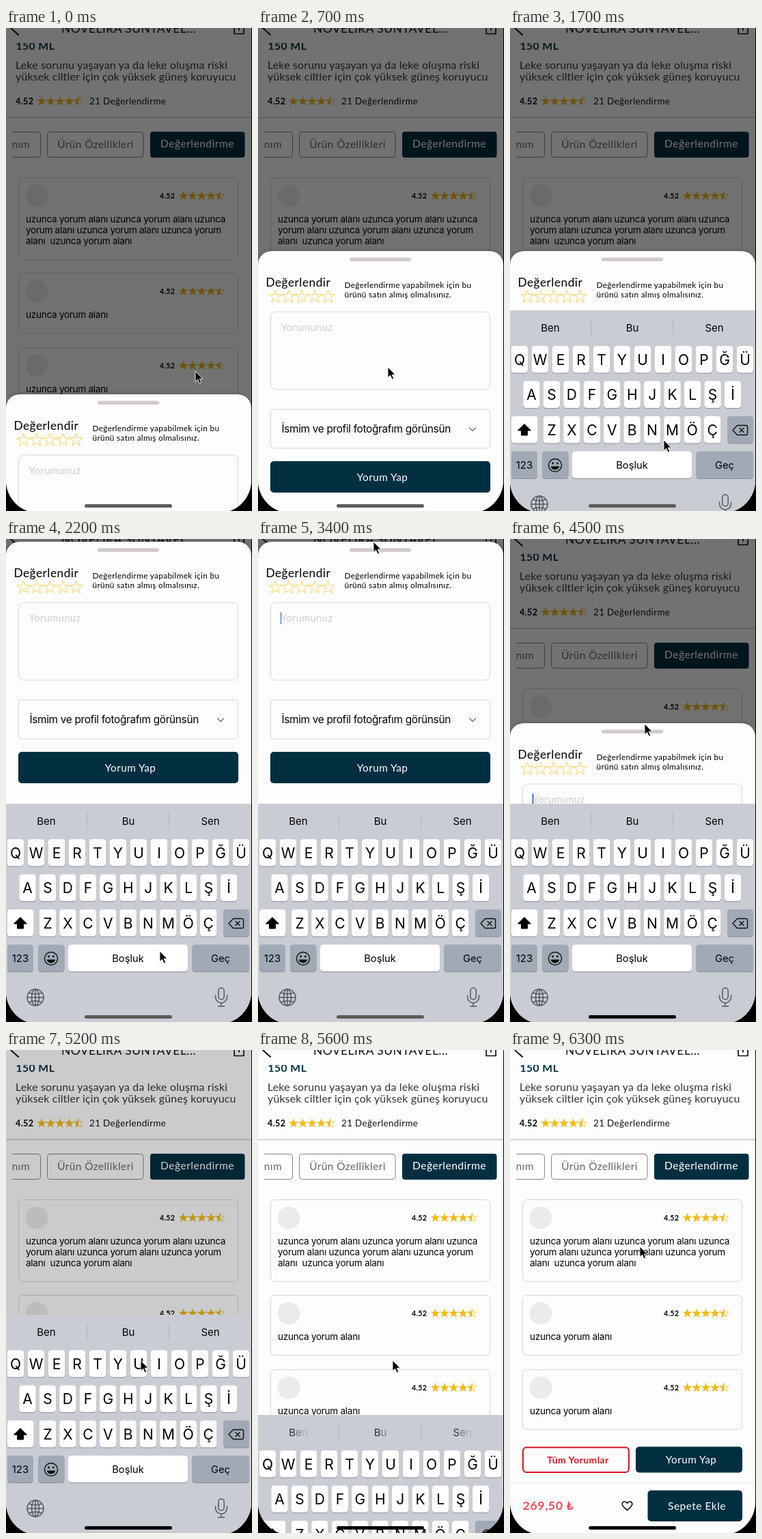
An HTML page that plays this animation: 360 by 708 pixels, repeating every 6400 ms.

```html
<!DOCTYPE html>
<html lang="tr">
<head>
<meta charset="utf-8">
<title>Değerlendirme</title>
<style>
html, body { margin: 0; width: 100%; height: 100%; overflow: hidden; background: #000; }
svg { display: block; width: 100%; height: 100%; }
text { font-family: Lato, "Open Sans", sans-serif; letter-spacing: .028em; white-space: pre; }
.copy text { letter-spacing: .012em; }
.ui { font-family: Inter, Roboto, sans-serif; letter-spacing: -.022em; }
.key { font-family: Inter, Roboto, sans-serif; letter-spacing: 0; }
.mid { text-anchor: middle; }
.b { font-weight: 700; }
.navy { fill: #022f40; }
.white { fill: #fff; }
.box { fill: none; stroke: #d6d6d6; }
.line { fill: none; stroke-linecap: round; stroke-linejoin: round; }

#sheet, #keys, #shade, #caret, #home, #cursor, .fade {
  animation: 6.4s step-end infinite;
}
#sheet { animation-name: sheet; filter: drop-shadow(0 0 3px rgba(0, 0, 0, .25)); }
#keys { animation-name: keys; }
#shade { animation-name: shade; }
#caret { animation-name: caret; }
#home { animation-name: home; }
#cursor { animation-name: cursor; }
.fade { animation-name: fade; }
#blink { animation: blink 1.066667s linear infinite; }

/* 1.5625% of the loop is 100 ms */
@keyframes sheet {
  0% { transform: translateY(537px); }
  1.5625% { transform: translateY(418px); }
  3.125% { transform: translateY(357px); }
  4.6875% { transform: translateY(334px); }
  6.25% { transform: translateY(327px); }
  28.125% { transform: translateY(190px); }
  29.6875% { transform: translateY(75px); }
  31.25% { transform: translateY(22px); }
  32.8125%, 53.125% { transform: translateY(4px); }
  54.6875% { transform: translateY(8px); animation-timing-function: steps(10); }
  70.3125% { transform: translateY(270px); animation-timing-function: steps(5); }
  78.125% { transform: translateY(453px); }
  79.6875% { transform: translateY(570px); }
  81.25% { transform: translateY(650px); }
  82.8125% { transform: translateY(695px); }
  84.375%, 100% { transform: translateY(730px); }
}
@keyframes shade {
  0%, 78.125% { opacity: .55; }
  79.6875% { opacity: .38; }
  81.25% { opacity: .2; }
  82.8125% { opacity: .08; }
  84.375%, 100% { opacity: 0; }
}
@keyframes keys {
  0% { transform: translateY(330px); }
  23.4375% { transform: translateY(200px); }
  25% { transform: translateY(90px); }
  26.5625% { transform: translateY(26px); }
  28.125% { transform: translateY(0); }
  85.9375% { transform: translateY(60px); }
  87.5% { transform: translateY(147px); }
  89.0625% { transform: translateY(235px); }
  90.625% { transform: translateY(300px); }
  92.1875%, 100% { transform: translateY(330px); }
}
@keyframes fade {
  0% { fill-opacity: 1; }
  87.5% { fill-opacity: var(--o); }
  89.0625%, 100% { fill-opacity: 0; }
}
@keyframes caret {
  0% { opacity: 0; }
  26.5625% { opacity: 1; }
  84.375%, 100% { opacity: 0; }
}
@keyframes blink {
  0%, 12% { opacity: 0; }
  21.8%, 62% { opacity: 1; }
  75%, 100% { opacity: 0; }
}
@keyframes home {
  0% { fill: #5f5a5b; }
  60.9375%, 100% { fill: #000; }
}
@keyframes cursor {
  0% { transform: translate(277px, 503px); animation-timing-function: steps(7); }
  10.9375% { transform: translate(190px, 497px); animation-timing-function: steps(7); }
  21.875% { transform: translate(205px, 505px); animation-timing-function: steps(3); }
  26.5625% { transform: translate(225px, 604px); }
  39.0625% { transform: translate(225px, 604px); animation-timing-function: steps(3); }
  43.75% { transform: translate(196px, 215px); animation-timing-function: steps(6); }
  53.125% { transform: translate(169px, 4px); }
  54.6875% { transform: translate(169px, 9px); animation-timing-function: steps(10); }
  70.3125% { transform: translate(197px, 271px); animation-timing-function: steps(5); }
  78.125% { transform: translate(197px, 455px); }
  87.5% { transform: translate(197px, 455px); animation-timing-function: steps(7); }
  98.4375%, 100% { transform: translate(190px, 288px); }
}
</style>
</head>
<body>
<svg viewBox="0 0 360 708" preserveAspectRatio="none">
  <defs>
    <path id="star" d="M0-10 2.4-3.2 9.5-3.1 3.8 1.2 5.9 8.1 0 4-5.9 8.1-3.8 1.2-9.5-3.1-2.4-3.2z"/>
    <g id="stars" fill="#efbb17">
      <use href="#star" transform="scale(.74)"/>
      <use href="#star" transform="translate(13.5) scale(.74)"/>
      <use href="#star" transform="translate(27) scale(.74)"/>
      <use href="#star" transform="translate(40.5) scale(.74)"/>
      <use href="#star" transform="translate(54) scale(.68)" fill="none" stroke="#efbb17"/>
      <path d="M54-7.400 52.200-2.400 47-2.300 51.200.9 49.600 6 54 3z"/>
    </g>
    <clipPath id="screen"><rect y="-100" width="359" height="811" rx="48"/></clipPath>
    <clipPath id="tabs"><rect x="9" y="145" width="350" height="50"/></clipPath>
  </defs>

  <g clip-path="url(#screen)">
    <rect width="360" height="712" fill="#fdfdfd"/>

    <g id="page">
      <text class="b navy" x="14.5" y="32" font-size="15.7">150 ML</text>
      <rect width="360" height="22" fill="#fdfdfd"/>
      <text class="mid" x="179.5" y="6.5" font-size="17.4" fill="#111">NOVELIRA SUNTAVEL...</text>
      <path class="line" d="M18-10 7 0 18 10" stroke="#111" stroke-width="2"/>
      <path class="line" d="M334-6V8.5H348V-6M341-8V3" stroke="#111" stroke-width="1.7"/>

      <g class="copy" font-size="15.9" fill="#333">
        <text x="14" y="60">Leke sorunu yaşayan ya da leke oluşma riski</text>
        <text x="14" y="77">yüksek ciltler için çok yüksek güneş koruyucu</text>
      </g>
      <text class="b" x="14" y="112" font-size="12.6">4.52</text>
      <use href="#stars" x="52" y="107.5"/>
      <text x="122" y="112" font-size="13.4" fill="#111">21 Değerlendirme</text>
      <rect y="130" width="360" height="2.5" fill="#dadada"/>

      <g clip-path="url(#tabs)" font-size="15.4">
        <rect class="box" x="-60" y="152.5" width="110.5" height="37" rx="4" style="stroke:#858585"/>
        <text x="35" y="175.5" text-anchor="end" fill="#6a6a6a">Kullanım</text>
        <rect class="box" x="60.5" y="152.5" width="140.5" height="37" rx="4" style="stroke:#858585"/>
        <text class="mid" x="131" y="175.5" fill="#666">Ürün Özellikleri</text>
        <rect class="navy" x="211" y="152" width="138.5" height="38" rx="4"/>
        <text class="mid white" x="280" y="175" font-size="15.7">Değerlendirme</text>
      </g>

      <g id="cards"></g>

      <rect x="19" y="582.5" width="155" height="36.5" rx="5" fill="none" stroke="#d41525" stroke-width="2"/>
      <text class="mid b" x="99.5" y="606" font-size="14" fill="#d41525">Tüm Yorumlar</text>
      <rect class="navy" x="184" y="581.5" width="156" height="38" rx="5"/>
      <text class="mid white" x="265" y="606" font-size="15.3">Yorum Yap</text>
      <rect y="633.5" width="360" height="1.5" fill="#ececec"/>
      <text class="b" x="18.5" y="674" font-size="17.9" fill="#ee4e5c">269,50 ₺</text>
      <path class="line" d="M171.5 674.5C167 671 164.2 668.5 164.2 665.6C164.2 661.5 169.3 660.7 171.5 664.2C173.7 660.7 178.8 661.5 178.8 665.6C178.8 668.5 176 671 171.5 674.5Z" stroke="#111" stroke-width="1.6"/>
      <rect class="navy" x="201.5" y="645.5" width="138.5" height="45.5" rx="5"/>
      <text class="mid white" x="273.5" y="674" font-size="15.6">Sepete Ekle</text>
    </g>

    <rect id="shade" width="360" height="712"/>

    <g id="sheet">
      <rect width="359" height="900" rx="20" fill="#fdfdfd"/>
      <rect x="134" y="9.5" width="90" height="5.5" rx="2.7" fill="#d3cacc"/>
      <text x="11.5" y="52" font-size="17.3">Değerlendir</text>
      <g id="rate" fill="none" stroke="#f4cf4a" stroke-width=".9"></g>
      <g font-size="11.8">
        <text x="126.5" y="54">Değerlendirme yapabilmek için bu</text>
        <text x="126.5" y="67.5">ürünü satın almış olmalısınız.</text>
      </g>
      <rect class="box" x="18.5" y="89" width="321" height="114" rx="8"/>
      <text x="33.5" y="117" font-size="14.6" fill="#cfcfcf">Yorumunuz</text>
      <g id="caret"><rect id="blink" x="32.5" y="103" width="2" height="18" rx="1" fill="#3f6fd8"/></g>
      <rect class="box" x="18.5" y="232" width="321" height="57" rx="4"/>
      <text class="ui" x="34.5" y="266" font-size="15.4">İsmim ve profil fotoğrafım görünsün</text>
      <path class="line" d="M309.5 259l4.5 4.5 4.5-4.5" stroke="#777" stroke-width="1.5"/>
      <rect class="navy" x="18" y="308" width="322" height="46" rx="5"/>
      <text class="mid white" x="182" y="336.5" font-size="15.3">Yorum Yap</text>
    </g>

    <g id="keys">
      <rect y="388" width="360" height="340" fill="#c9ccd3"/>
      <path d="M118.5 401V425M238.5 401V425" stroke="#b3b6bc"/>
      <g id="hints" class="mid"></g>
      <g id="caps"></g>
      <path d="M21 554.5 30.5 564H25.5V571H16.5V564H11.5Z" stroke="#000" stroke-linejoin="round"/>
      <g class="line" stroke="#111" stroke-width="1.4">
        <path d="M326 563.5 332.5 556.5H345.5Q347.5 556.5 347.5 558.5V568.5Q347.5 570.5 345.5 570.5H332.5ZM336 560.5l6 6M342 560.5l-6 6"/>
        <circle cx="66" cy="615" r="9.5"/>
      </g>
      <circle cx="62.7" cy="612" r="1.4"/>
      <circle cx="69.3" cy="612" r="1.4"/>
      <path d="M60 616.5H72A6 5 0 0 1 60 616.5Z"/>
      <g class="line" stroke="#55585e" stroke-width="1.5">
        <circle cx="43" cy="672" r="12"/>
        <ellipse cx="43" cy="672" rx="5.5" ry="12"/>
        <path d="M43 660V684M31 672H55M33.5 665Q43 669 52.5 665M33.5 679Q43 675 52.5 679"/>
        <rect x="310.8" y="658" width="8.4" height="17" rx="4.2"/>
        <path d="M306.5 669V671.5A8.5 8.5 0 0 0 323.5 671.5V669M315 680V685M310.5 685H319.5"/>
      </g>
    </g>

    <rect id="home" x="115" y="698" width="128" height="5" rx="2.5"/>
  </g>

  <path id="cursor" d="M0 0V15.5L3.6 12.2 6.1 18 8.7 16.9 6.2 11.2H11Z" stroke="#fff" stroke-width=".9"/>
</svg>
<script>
const fill = (id, html) => { document.getElementById(id).innerHTML = html; };
const text = (s, x, y, cls, size) =>
  `<text class="${cls}" x="${x}" y="${y}" font-size="${size}">${s}</text>`;

const card = (y, h, lines) =>
  `<rect class="box" x="18.5" y="${y - .5}" width="321" height="${h}" rx="6"/>
   <circle cx="45" cy="${y + 26}" r="16.5" fill="#ebebeb"/>
   ${text('4.52', 225, y + 30, 'b', 10.7)}
   <use href="#stars" x="259.5" y="${y + 26}"/>` +
  lines.map((s, i) => text(s, 29, y + 65 + 16 * i, 'ui', 13.6)).join('');

const note = 'uzunca yorum alanı';
fill('cards',
  card(220, 120, [`${note} ${note} uzunca`, `yorum alanı ${note} uzunca yorum`, `alanı  ${note}`]) +
  card(360, 88, [note]) +
  card(469, 88, [note]));

fill('rate', [0, 1, 2, 3, 4].map(i =>
  `<use href="#star" x="${25.5 + 19.3 * i}" y="67"/>`).join(''));

const fades = [.75, .4, .15];
fill('hints', ['Ben', 'Bu', 'Sen'].map((word, i) => text(
  [...word].map((c, k) => `<tspan class="fade" style="--o:${fades[k]}">${c}</tspan>`).join(''),
  59 + 120 * i, 418.5, 'key', 15)).join(''));

const key = (x, y, w, label = '', color = '#fff', size = 21) =>
  `<rect x="${x}" y="${y + 1}" width="${w}" height="39.5" rx="4.5" fill="#8b8e94"/>
   <rect x="${x}" y="${y}" width="${w}" height="39.5" rx="4.5" fill="${color}"/>` +
  text(label, x + w / 2, y + 20 + size * .36, 'key mid', size);
const row = (chars, x, step, y) =>
  [...chars].map((c, i) => key(x + step * i - 12.2, y, 24.4, c)).join('');

const gray = '#a1a9b6';
fill('caps',
  row('QWERTYUIOPĞÜ', 14, 30, 440) +
  row('ASDFGHJKLŞİ', 31.5, 29.45, 491.5) +
  row('ZXCVBNMÖÇ', 61, 29.4, 543) +
  key(2, 543, 38.5) +
  key(318, 543, 38, '', gray) +
  key(2, 594.5, 38, '123', gray, 15) +
  key(47, 594.5, 38.5, '', gray) +
  key(91, 594.5, 175, 'Boşluk', '#fff', 14.7) +
  key(272, 594.5, 84, 'Geç', gray, 14.7));
</script>
</body>
</html>
```
